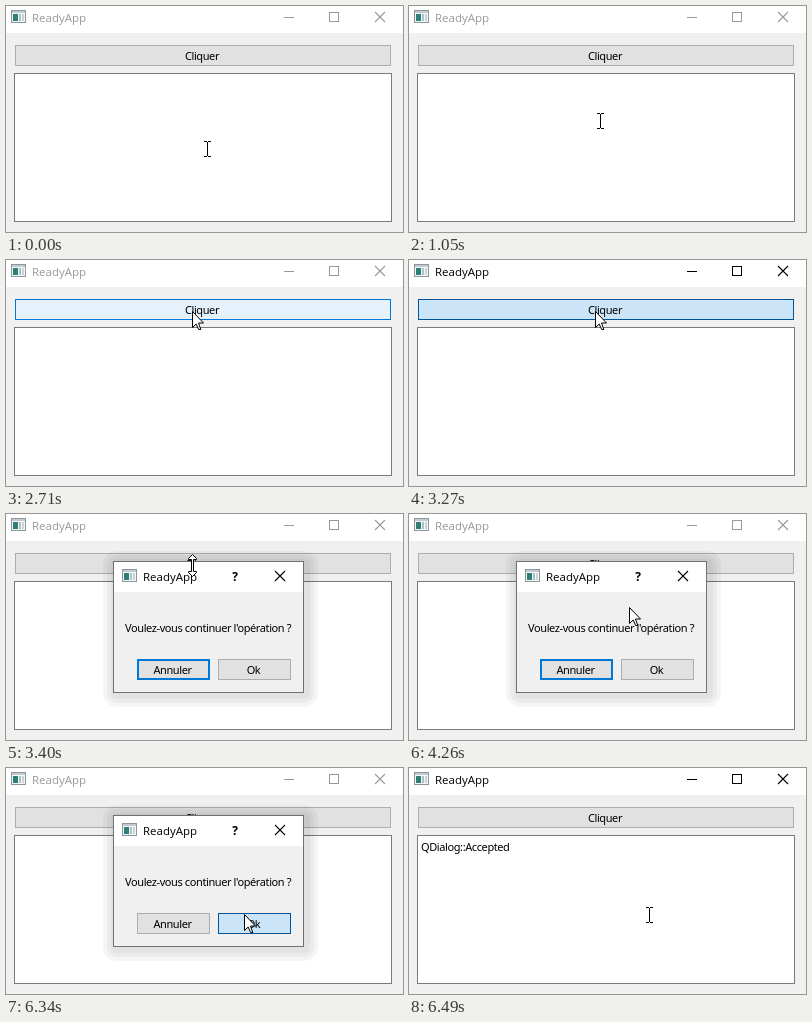
Animation, 397 px wide and 226 px high, one loop 8 s. Source, as an HTML page with a canvas:

```html
<!DOCTYPE html>
<html lang="fr">
<head>
<meta charset="utf-8">
<title>ReadyApp</title>
<style>
  html, body { margin: 0; width: 100%; height: 100%; overflow: hidden; background: #f0f0f0; }
  canvas { display: block; }
</style>
</head>
<body>
<canvas id="stage" width="397" height="226"></canvas>
<script>
const ctx = document.getElementById('stage').getContext('2d');
const LOOP = 8000;
const TITLE_FONT = '11.5px "Open Sans", sans-serif';
const BODY_FONT = '11px "Noto Sans", sans-serif';

const HOVER = 2430, PRESS = 3270, DIALOG = 3400, OK_HOVER = 5290, OK_PRESS = 6340, CLOSED = 6490;

const STYLES = {
  normal:  ['#e1e1e1', '#adadad', 1],
  focused: ['#e1e1e1', '#0078d7', 2],
  hover:   ['#e5f1fb', '#0078d7', 1],
  pressed: ['#cce4f7', '#005499', 1],
};

// Pointer steps: time, shape, left, top
const POINTER = [
  [0, beam, 198, 135], [500, beam, 194, 130], [620, beam, 190, 124], [770, beam, 189, 118],
  [930, beam, 188, 113], [1050, beam, 188, 107], [1190, beam, 188, 99], [1340, beam, 188, 81],
  [1480, beam, 188, 73], [1610, beam, 188, 67], [1740, beam, 188, 62], [1870, arrow, 189, 61],
  [2430, arrow, 187, 58], [2550, arrow, 186, 55], [2710, arrow, 186, 51], [3400, resize, 182, 40],
  [3980, arrow, 187, 53], [4110, arrow, 188, 57], [4260, arrow, 220, 93], [4410, arrow, 228, 106],
  [4540, arrow, 233, 115], [4690, arrow, 235, 128], [4840, arrow, 236, 138], [4990, arrow, 236, 140],
  [5140, arrow, 236, 142], [5290, arrow, 236, 146], [5590, arrow, 238, 146], [6490, beam, 237, 139],
];

function rect(x, y, w, h, fill) {
  ctx.fillStyle = fill;
  ctx.fillRect(x, y, w, h);
}

function box(x, y, w, h, fill, border, line = 1) {
  rect(x, y, w, h, border);
  rect(x + line, y + line, w - 2 * line, h - 2 * line, fill);
}

function text(str, x, y, { font = BODY_FONT, color = '#000', align = 'left', spacing = '-0.4px' } = {}) {
  ctx.font = font;
  ctx.letterSpacing = spacing;
  ctx.textAlign = align;
  ctx.fillStyle = color;
  ctx.fillText(str, x, y);
}

function button(label, x, y, w, style) {
  box(x, y, w, 21, ...STYLES[style]);
  text(label, x + w / 2 - 1, y + 15, { align: 'center' });
}

function icon(x, y) {
  box(x, y, 15, 13, '#f4f7f8', '#8b959c');
  rect(x + 1, y + 1, 13, 2, '#c3cbd0');
  rect(x + 2, y + 4, 5, 7, '#2f7f78');
  rect(x + 8, y + 4, 2, 7, '#a9c4c6');
  rect(x + 11, y + 4, 2, 7, '#ccd3d6');
}

function closeCross(x, y, color) {
  ctx.strokeStyle = color;
  ctx.lineWidth = 1.1;
  ctx.beginPath();
  ctx.moveTo(x, y);
  ctx.lineTo(x + 10, y + 10);
  ctx.moveTo(x + 10, y);
  ctx.lineTo(x, y + 10);
  ctx.stroke();
}

function caption(x, y, color) {
  icon(x + 5, y + 4);
  text('ReadyApp', x + 26, y + 16, { font: TITLE_FONT, color, spacing: '0px' });
}

function mainWindow(t) {
  const active = t >= PRESS && t < DIALOG || t >= CLOSED;
  const ink = active ? '#000' : '#999';
  const state = t < HOVER || t >= DIALOG ? 'normal' : t < PRESS ? 'hover' : 'pressed';
  rect(0, 0, 397, 226, '#f0f0f0');
  rect(0, 0, 397, 27, '#fff');
  caption(0, 0, ink);
  rect(278, 11, 10, 1, ink);
  box(323, 6, 10, 10, '#fff', ink);
  closeCross(369, 6, ink);
  button('Cliquer', 9, 39, 376, state);
  box(8, 67, 378, 149, '#fff', '#7a7a7a');
  if (t >= CLOSED) text('QDialog::Accepted', 12, 83);
}

function dialog(t) {
  for (const grow of [12, 8, 4]) {
    ctx.fillStyle = 'rgba(0, 0, 0, 0.04)';
    ctx.beginPath();
    ctx.roundRect(109 - grow, 49 - grow, 191 + 2 * grow, 132 + 2 * grow, grow + 2);
    ctx.fill();
  }
  box(107, 47, 191, 132, '#f0f0f0', '#707070');
  rect(108, 48, 189, 30, '#fff');
  caption(111, 51, '#000');
  text('?', 229, 67, { font: 'bold 12px "Open Sans", sans-serif', align: 'center', spacing: '0px' });
  closeCross(269, 57, '#000');
  text("Voulez-vous continuer l'opération ?", 119, 118);
  button('Annuler', 131, 145, 73, t < OK_PRESS ? 'focused' : 'normal');
  button('Ok', 212, 145, 73, t < OK_HOVER ? 'normal' : t < OK_PRESS ? 'hover' : 'pressed');
}

function beam(x, y) {
  for (const row of [0, 15]) {
    rect(x, y + row, 3, 1, '#000');
    rect(x + 4, y + row, 3, 1, '#000');
  }
  rect(x + 3, y + 1, 1, 14, '#000');
}

function outline(x, y, path) {
  ctx.save();
  ctx.translate(x + 0.5, y + 0.5);
  const shape = new Path2D(path);
  ctx.fillStyle = '#fff';
  ctx.fill(shape);
  ctx.strokeStyle = '#000';
  ctx.lineWidth = 1;
  ctx.stroke(shape);
  ctx.restore();
}

function arrow(x, y) {
  outline(x, y, 'M0 0V16L3.7 12.5 6.2 18H8.3L6 11.5H11Z');
}

function resize(x, y) {
  outline(x, y, 'M4 0L8 4V5H5V17H8V18L4 22 0 18V17H3V5H0V4Z');
}

function draw(now) {
  const t = now % LOOP;
  mainWindow(t);
  if (t >= DIALOG && t < CLOSED) dialog(t);
  const [, shape, x, y] = POINTER.findLast(([start]) => start <= t);
  shape(x, y);
}

const start = performance.now();
function tick() {
  draw(performance.now() - start);
  requestAnimationFrame(tick);
}
tick();
</script>
</body>
</html>
```
